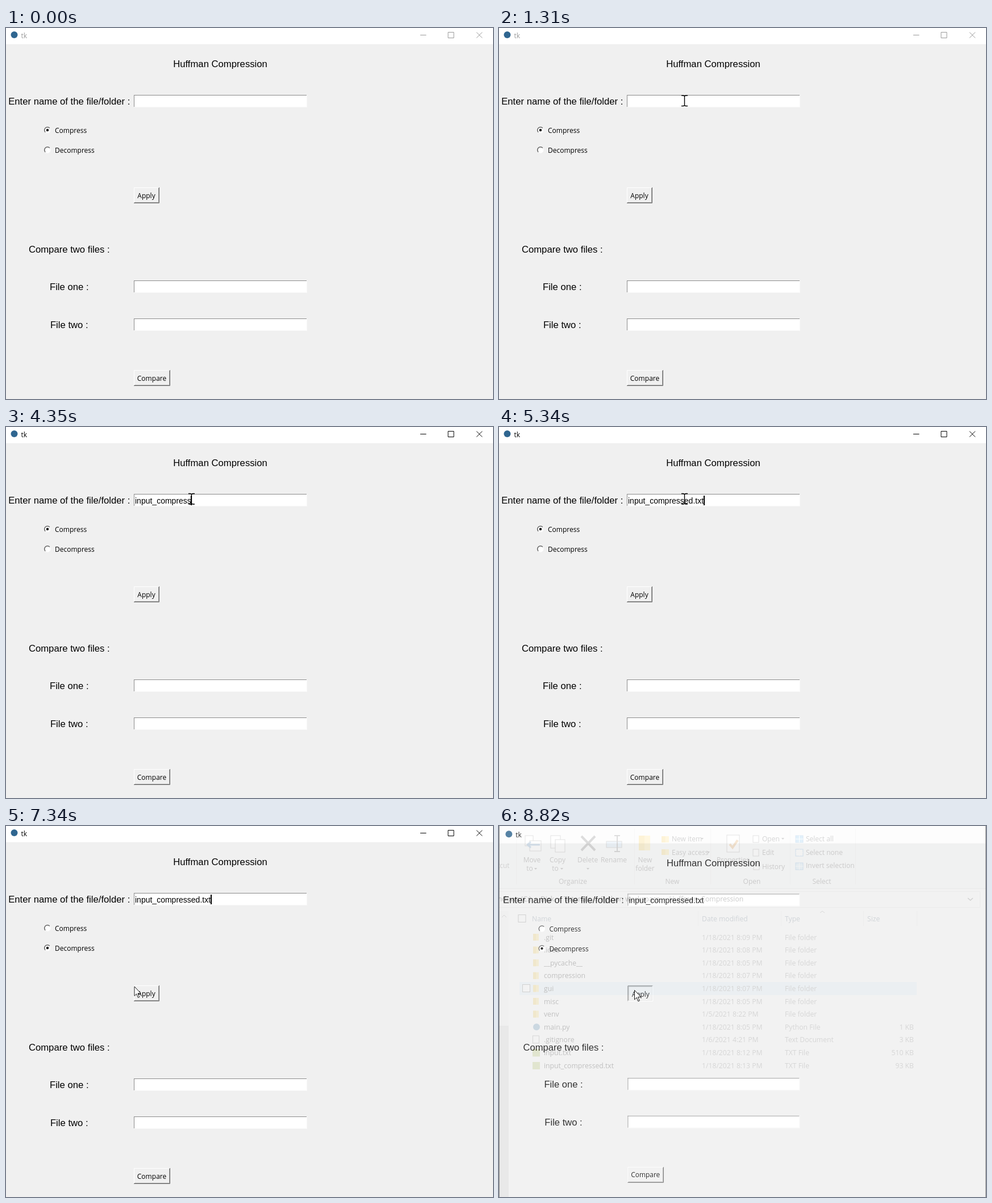
These frames come from a looping animation (857x654 px, 8.92 s). An HTML page:

```html
<!DOCTYPE html>
<html lang="en">
<head>
<meta charset="utf-8">
<title>Huffman Compression</title>
<style>
  html, body { margin: 0; width: 100%; height: 100%; overflow: hidden; background: #fff; }
  svg { display: block; width: 857px; height: 654px; }
  text { font: 12px "Open Sans", sans-serif; white-space: pre; }
  .label { font: 16.7px "Liberation Sans", Arial, sans-serif; text-anchor: middle; }
  .entry { font: 14px "Liberation Sans", Arial, sans-serif; }
  .list { font-size: 12.2px; }
  .mid { text-anchor: middle; }
  .end { text-anchor: end; }
</style>
</head>
<body>
<svg id="stage" viewBox="0 0 857 654"></svg>
<script>
const LOOP = 8920;
const CENTER = [428, 335];
const $ = id => document.getElementById(id);
const text = (x, y, s, cls = '', fill = '#000') =>
  `<text x="${x}" y="${y}" class="${cls}" fill="${fill}">${s}</text>`;
const rect = (x, y, w, h, fill, extra = '') =>
  `<rect x="${x}" y="${y}" width="${w}" height="${h}" fill="${fill}" ${extra}/>`;
const line = (d, stroke, width = 1, extra = '') =>
  `<path d="${d}" fill="none" stroke="${stroke}" stroke-width="${width}" ${extra}/>`;

// File manager that shows through once the window starts to close
function explorer() {
  const grey = '#6d6d6d';
  const folder = (x, y, w, h) => rect(x, y, w, h, '#ffd868') + rect(x, y, w / 2, h, '#f5c33b');
  const sheet = (x, y, w, h) => rect(x, y, w, h, '#fff', 'stroke="#777"');
  const drop = (x, y) => `<path d="M${x} ${y}h5l-2.5 3z" fill="#444"/>`;
  const rows = [
    ['.git', '1/18/2021 8:09 PM'], ['.idea', '1/18/2021 8:08 PM'],
    ['__pycache__', '1/18/2021 8:05 PM'], ['compression', '1/18/2021 8:07 PM'],
    ['gui', '1/18/2021 8:07 PM'], ['misc', '1/18/2021 8:05 PM'], ['venv', '1/5/2021 8:22 PM'],
    ['main.py', '1/18/2021 8:05 PM', 'Python File', '1 KB'],
    ['.gitignore', '1/6/2021 4:21 PM', 'Text Document', '3 KB'],
    ['input.txt', '1/18/2021 8:12 PM', 'TXT File', '510 KB'],
    ['input_compressed.txt', '1/18/2021 8:13 PM', 'TXT File', '93 KB']
  ];
  const fileIcon = {
    'main.py': y => `<circle cx="66" cy="${y}" r="6" fill="#3b78a8"/>`,
    '.gitignore': y => sheet(59.5, y - 7, 11, 13)
  };
  let s = rect(0, 0, 857, 654, '#fff') + rect(0, 0, 857, 110, '#f5f6f7') +
    line('M0 110.5H857', '#d0d0d0') +
    line('M30.5 5V103M238.5 5V103M372.5 5V103M512.5 5V103M627.5 5V103', '#dcdcdc');

  s += sheet(46, 17, 14, 18) + sheet(54, 26, 20, 18) + line('M72 33H50m6-5l-6 5 6 5', '#4a80b5', 3) +
    sheet(91, 17, 17, 22) + sheet(99, 24, 17, 22) +
    line('M145 18L169 43M169 18L145 43', '#555', 4) +
    rect(189, 27, 27, 11, '#b9d8f2', 'stroke="#777"') + line('M203 17h10m-5 0v28m-5 0h10', '#555', 2) +
    folder(246, 17, 20, 26) + folder(286, 18, 13, 11) + folder(286, 41, 13, 10) +
    sheet(401, 16, 22, 30) + line('M406 32l5 6 9-13', '#db8b2a', 4) +
    sheet(447, 17, 10, 12) + sheet(447, 41, 10, 12) + sheet(448, 66, 10, 11);
  for (const [i, fill] of ['#70b9ee', '#fff', '#b9dcf5'].entries())
    s += rect(522, 17 + i * 24, 13, 12, fill, 'stroke="#4f98d0"') +
      line(`M528.5 ${17 + i * 24}v12m-6.5-6h13`, '#fff');

  const ribbon = [
    [58, 64, 'Move'], [54, 79, 'to'], [103, 64, 'Copy'], [99, 79, 'to'], [156, 64, 'Delete'],
    [202, 64, 'Rename'], [257, 64, 'New'], [257, 79, 'folder'], [412, 64, 'Properties'],
    [130, 102, 'Organize'], [305, 102, 'New'], [445, 102, 'Open'], [568, 102, 'Select']
  ];
  for (const [x, y, name] of ribbon) s += text(x, y, name, 'mid', '#333');
  const commands = [
    [304, 27, 'New item'], [304, 51, 'Easy access'], [463, 27, 'Open'], [463, 51, 'Edit'],
    [463, 76, 'History'], [540, 27, 'Select all'], [540, 51, 'Select none'], [540, 74, 'Invert selection']
  ];
  for (const [x, y, name] of commands) s += text(x, y, name, '', '#333');
  s += text(-3, 74, 'tcut', '', '#555') + drop(62, 74) + drop(108, 74) + drop(154, 74) +
    drop(355, 21) + drop(366, 45) + drop(497, 21);

  s += line('M-1 115.5H846.5V143.5H-1', '#d9d9d9') +
    text(-2, 133, 'ndows (C:)  ›  Disk  ›  Tutorials  ›  Python workspace  ›  Huffman_Compression', 'list') +
    line('M825 127l4.5 4 4.5-4', '#555', 1.5) +
    rect(0, 150, 17, 504, '#f5f5f5') + rect(0, 352, 17, 302, '#cdcdcd') +
    line('M5 161l4-4 4 4M565 153l4-3 4 3', '#777') +
    line('M350.5 150V176M496.5 150V176M641.5 150V176M735.5 150V176', '#e5e5e5') +
    rect(36, 275, 699, 23, '#d8edfc');
  for (const [x, y] of [[34, 156.5], [41.5, 279.5]]) s += rect(x, y, 13, 13, '#fff', 'stroke="#555"');
  for (const [x, name] of [[58, 'Name'], [357, 'Date modified'], [503, 'Type'], [648, 'Size']])
    s += text(x, 168, name, 'list', '#53677c');
  rows.forEach(([name, date, type, size = ''], i) => {
    const y = 196 + i * 22.6;
    const icon = fileIcon[name] || (y => rect(59, y - 6, 13, 13, '#a7b94b'));
    s += (type ? icon(y) : folder(60, y - 6, 10, 12)) +
      text(79, y + 4.5, name, 'list') + text(357, y + 4.5, date, 'list', grey) +
      text(503, y + 4.5, type || 'File folder', 'list', grey) + text(730, y + 4.5, size, 'list end', grey);
  });
  return s;
}

const field = y => rect(225, y, 305, 22, '#fff') +
  line(`M225 ${y + .5}H529.5M225.5 ${y}V${y + 21.5}`, '#8c8c8c') +
  line(`M225 ${y + 21.5}H529.5V${y}`, '#f7f7f7');

function button(x, y, w, label, sunken) {
  const h = 28;
  const [light, dark] = sunken ? ['#696969', '#fff'] : ['#fff', '#696969'];
  const [inner, shade] = sunken ? ['#a0a0a0', '#e3e3e3'] : ['#f0f0f0', '#a0a0a0'];
  const shift = sunken ? 1 : 0;
  return rect(x, y, w, h, '#f0f0f0') +
    line(`M${x + .5} ${y + h}V${y + .5}H${x + w}`, light) +
    line(`M${x + 1.5} ${y + h - 1}V${y + 1.5}H${x + w - 1}`, inner) +
    line(`M${x + 1} ${y + h - 1.5}H${x + w - 1.5}V${y + 1}`, shade) +
    line(`M${x} ${y + h - .5}H${x + w - .5}V${y}`, dark) +
    text(x + w / 2 - .5 + shift, y + 18.5 + shift, label, 'mid');
}

const radio = y => `<circle cx="73" cy="${y}" r="5.5" fill="#fff"/>` +
  line(`M69.2 ${y + 3.8}A5.2 5.2 0 0 1 76.8 ${y - 3.6}`, '#606060', 1.5);

$('stage').innerHTML = explorer() + `<g id="window">
  ${rect(-3, -5, 863, 670, '#f0f0f0')}${rect(-3, -5, 863, 33.5, '#fff')}
  <circle cx="14.5" cy="12" r="6" fill="#2f6690"/>
  <text id="title" x="26.5" y="17.5">tk</text>
  ${line('M729 12.5h10.5M778 7.5h10v10h-10zM828 7.5l10 10M838 7.5l-10 10', '#000', 1, 'id="controls"')}
  ${text(377, 69, 'Huffman Compression', 'label')}
  ${text(111.3, 135, 'Enter name of the file/folder :', 'label')}
  ${text(111.3, 396, 'Compare two files :', 'label')}
  ${text(111.3, 462, 'File one :', 'label')}
  ${text(111.3, 529, 'File two :', 'label')}
  ${field(118)}${field(445)}${field(512)}
  <text id="typed" class="entry" x="227" y="134.5"></text>
  ${rect(226, 121, 2, 17, '#000', 'id="caret"')}
  ${radio(180)}${radio(215)}<circle id="dot" cx="73" r="2.2"/>
  ${text(86, 185, 'Compress')}${text(86, 220.3, 'Decompress')}
  <g id="raised">${button(225, 281, 45, 'Apply')}</g>
  <g id="sunken">${button(225, 281, 45, 'Apply', true)}</g>
  ${button(225, 603, 64, 'Compare')}
  ${line('M-2.5 -5V665M859.5 -5V665', '#777', 1, 'id="border"')}
</g>
<g id="pointer">
  <path id="arrow" d="M.5 .5V17L4.2 13.4 6.9 20 9.3 19 6.6 12.5H11.8Z" fill="#fff" stroke="#000" stroke-width=".9"/>
  ${line('M-5 -9H-1.5L.5 -8 2.5 -9H6M-5 9.5H-1.5L.5 8.5 2.5 9.5H6M.5 -8V8.5', '#000', 1.4, 'id="beam"')}
</g>`;

const NAME = 'input_compressed.txt';
const KEYS = [2260, 2340, 2410, 2500, 2580, 2880, 2960, 3130, 3220, 3300,
  3450, 3850, 4180, 4350, 4440, 4600, 4760, 4930, 5090, 5340];
// Pointer stops: time, x, y
const PATH = [
  [70, 576, 585], [500, 400, 350], [850, 262, 180], [930, 270, 162], [1310, 326, 128], [1600, 326, 125.5],
  [4180, 326, 125.5], [4350, 326, 126.5], [5590, 326, 126.5], [6090, 118, 208], [6170, 112, 192],
  [6250, 112, 192], [6330, 124, 207], [6420, 126, 206], [6660, 126, 206],
  [7340, 225.5, 282.5], [7420, 234, 287], [7500, 238, 289], [LOOP, 238, 289]
];
const STEP = 84;

function pointerAt(t) {
  const i = Math.max(1, PATH.findIndex(p => p[0] > t));
  const [[t0, x0, y0], [t1, x1, y1]] = [PATH[i - 1], PATH[i]];
  const ticks = Math.max(1, Math.round((t1 - t0) / STEP));
  const u = Math.floor((t - t0) / (t1 - t0) * ticks) / ticks;
  return [x0 + (x1 - x0) * u, y0 + (y1 - y0) * u];
}

const show = (id, on) => $(id).setAttribute('visibility', on ? 'visible' : 'hidden');

function draw(t) {
  const closing = t >= 8630;
  const tone = t < 1520 ? '#999' : '#000';
  $('title').setAttribute('fill', tone);
  $('controls').setAttribute('stroke', tone);
  show('controls', !closing);
  show('border', closing);

  const typed = $('typed');
  typed.textContent = NAME.slice(0, KEYS.filter(k => k <= t).length);
  $('caret').setAttribute('x', Math.round(226.5 + typed.getComputedTextLength()));
  show('caret', t >= 1520 && t < 8380 && (t - 2090 + 899) % 899 >= 268);

  $('dot').setAttribute('cy', t < 6580 ? 180 : 215);
  show('raised', t < 8460);
  show('sunken', t >= 8460);

  const [scale, alpha] = t >= 8820 ? [.993, .8] : t >= 8720 ? [.997, .92] : closing ? [.999, .98] : [1, 1];
  const [cx, cy] = CENTER;
  $('window').setAttribute('transform', `translate(${cx} ${cy}) scale(${scale}) translate(${-cx} ${-cy})`);
  $('window').setAttribute('opacity', alpha);

  const [x, y] = pointerAt(t);
  const overField = x > 225 && x < 530 && y > 118 && y < 140;
  $('pointer').setAttribute('transform', `translate(${x} ${y})`);
  show('arrow', t >= 70 && !overField);
  show('beam', t >= 70 && overField);
}

function tick() {
  draw(performance.now() % LOOP);
  requestAnimationFrame(tick);
}
tick();
</script>
</body>
</html>
```
